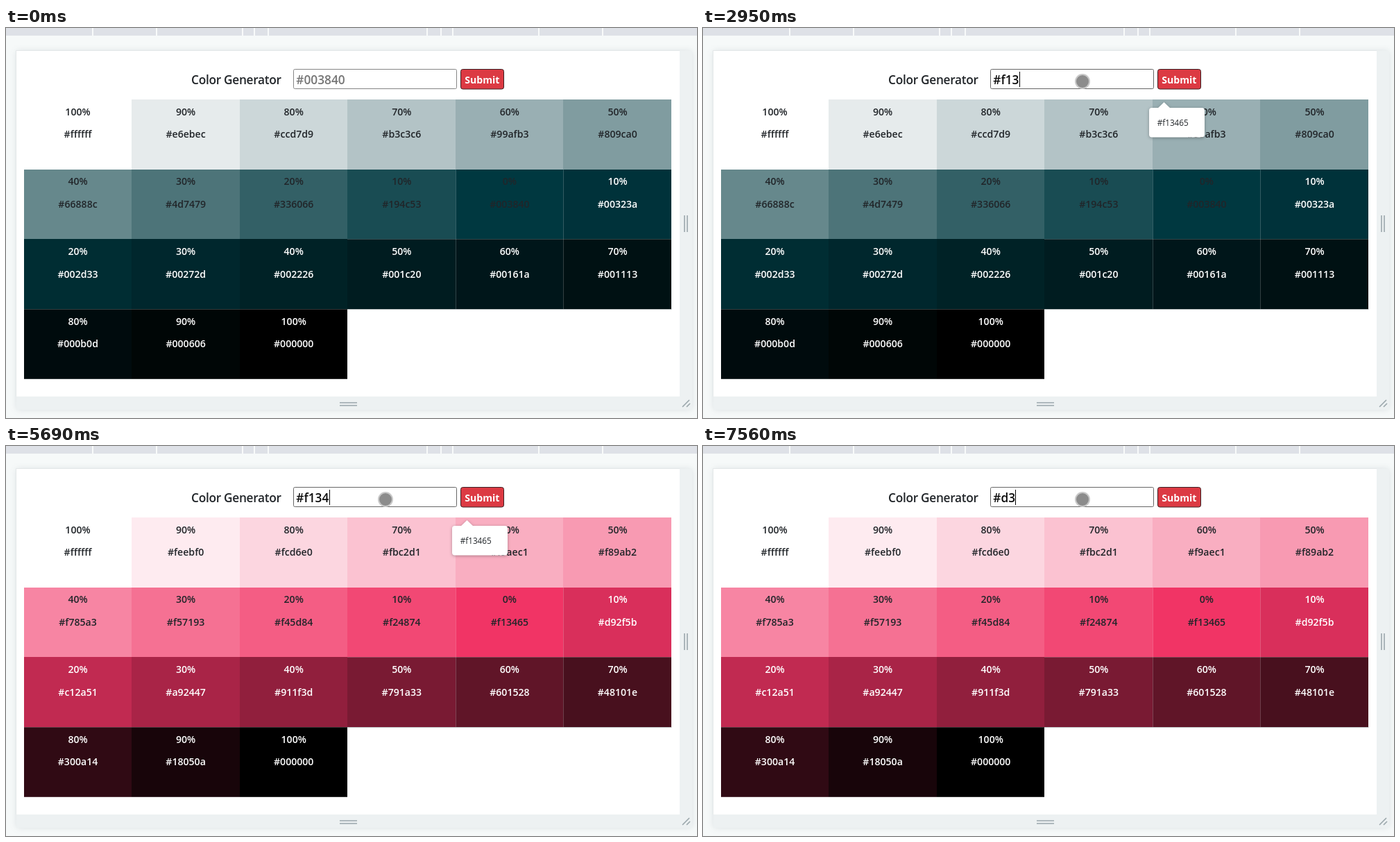
Recreate the animation shown at these times as an HTML page. Size 996 px wide and 562 px high, loop 8000 ms.

```html
<!DOCTYPE html>
<html lang="en">
<head>
<meta charset="utf-8">
<title>Color Generator</title>
<style>
  html, body { margin: 0; width: 100%; height: 100%; overflow: hidden; background: #f6f9f9; }
  svg { display: block; width: 996px; height: 562px; font: 600 14.1px "Open Sans", "Noto Sans", sans-serif; }
  .mid { text-anchor: middle; }
  .field { font-size: 17.3px; }
  .panel { filter: drop-shadow(0 0 5px rgba(60, 80, 90, .14)); }
  #popup { filter: drop-shadow(0 1px 2px rgba(0, 0, 0, .3)); }
  #items { font-size: 11.7px; font-weight: 400; fill: #212529; }
</style>
</head>
<body>
<svg viewBox="0 0 996 562">
  <rect width="996" height="11" fill="#dee1e7"/>
  <path d="M125 0v11M217 0v11M341 0v11M358 0v11M378 0v11M607 0v11M627 0v11M644 0v11M768 0v11M860 0v11" stroke="#f8fafa" stroke-width="2"/>
  <g class="panel">
    <rect x="15" y="33" width="974" height="517" fill="#edf1f2"/>
    <rect x="15" y="33" width="956" height="498" fill="#fff"/>
  </g>
  <path d="M14.5 531V32.5H971" fill="none" stroke="#e3e7e8"/>
  <path d="M978 270v24M982 270v24M481 540h25M481 544h25M975 546l10-10M981 546l5-5" stroke="#9ba7ac" stroke-width="1.6"/>

  <text x="267" y="80.5" font-size="17.3" letter-spacing="-.3" fill="#212529">Color Generator</text>
  <rect id="box" x="414.5" y="59.5" width="235" height="28" rx="2" fill="#fff"/>
  <text id="value" class="field" x="418.3" y="80.5"></text>
  <rect id="caret" y="63" width="1" height="22"/>
  <rect x="655.5" y="59.5" width="62" height="28.5" rx="3" fill="#dc3a43" stroke="#3c2023"/>
  <text class="mid" x="686.3" y="79.6" font-weight="700" fill="#fff">Submit</text>

  <g id="cells"></g>
  <path d="M648.5 204V405M803.5 204V405M959.5 204V405M492 304.5H959M26 405.5H492M26 505.5H492" stroke="#fff" stroke-opacity=".2" fill="none"/>
  <path d="M492 405.5H959.5" stroke="#8a9597" stroke-opacity=".55"/>

  <g id="popup">
    <path d="M655 116l9.5-9 9.5 9z" fill="#fff"/>
    <rect id="sheet" x="643" y="115" width="80" rx="4" fill="#fff"/>
    <g id="items"></g>
  </g>
  <circle id="mouse" r="10" fill="#868686" fill-opacity=".95" stroke="#c9c9c9" stroke-width="2"/>
</svg>

<script>
const LOOP = 8000;
const HISTORY = ['#f34256', '#f13465', '#00161a', '#001c20', '#f34573', '#ffffff'];
const TYPED = [
  [0, ''], [1830, '#'], [2290, '#f'], [2620, '#f1'], [2950, '#f13'], [3150, '#f134'],
  [3430, '#f1346'], [3570, '#f13465'], [5290, '#f1346'], [5690, '#f134'], [5820, '#f13'],
  [5960, '#f1'], [6030, '#f'], [6430, '#'], [6960, '#d'], [7490, '#d3']
];
const CARET_FLIPS = [1100, 1560, 1830, 4100, 4560, 5020, 5220];

const $ = id => document.getElementById(id);
const ramp = (t, a, b) => Math.min(1, Math.max(0, (t - a) / (b - a)));
const mix = (a, b, k) => a + (b - a) * k;

function add(parent, name, attrs) {
  const el = document.createElementNS('http://www.w3.org/2000/svg', name);
  for (const key in attrs) el.setAttribute(key, attrs[key]);
  return parent.appendChild(el);
}

// 100% tint down to the base colour, then up to 100% shade
function palette(base) {
  const rgb = [1, 3, 5].map(i => parseInt(base.substr(i, 2), 16));
  return Array.from({ length: 21 }, (_, i) => {
    const percent = Math.abs(100 - i * 10), keep = (100 - percent) / 100;
    const end = i < 10 ? 255 : 0;
    return '#' + rgb.map(c => Math.round(c * keep + end * (1 - keep))
      .toString(16).padStart(2, '0')).join('');
  });
}

const colX = i => Math.floor(26 + 155.5 * i);
const rowY = j => Math.round(103 + 100.7 * j);
const cells = Array.from({ length: 21 }, (_, i) => {
  const c = i % 6, r = Math.floor(i / 6), x = 103.5 + 155.6 * c, y = 125.6 + 100.7 * r;
  const label = { class: 'mid', x, fill: i > 10 ? '#fff' : '#212529' };
  const rect = add($('cells'), 'rect', {
    x: colX(c), y: rowY(r), width: colX(c + 1) - colX(c), height: rowY(r + 1) - rowY(r)
  });
  add($('cells'), 'text', { ...label, y }).textContent = Math.abs(100 - i * 10) + '%';
  return { rect, text: add($('cells'), 'text', { ...label, y: y + 32.7 }) };
});

const rows = HISTORY.map((_, i) => add($('items'), 'text', { x: 654.7, y: 140.8 + 34.5 * i }));
const palettes = ['#003840', '#f13465'].map(palette);
let shown;

function setPalette(colors) {
  if (shown === colors) return;
  shown = colors;
  cells.forEach((cell, i) => {
    cell.rect.setAttribute('fill', colors[i]);
    cell.text.textContent = colors[i];
  });
}

function drawField(t, value) {
  $('box').setAttribute('stroke', t < 1100 ? '#858585' : '#666');
  $('value').textContent = value || '#003840';
  $('value').setAttribute('fill', value ? '#0c0c0c' : '#757575');
  const width = value ? $('value').getComputedTextLength() : 0;
  $('caret').setAttribute('x', Math.round(418.6 + width));
  $('caret').setAttribute('opacity', CARET_FLIPS.filter(f => f <= t).length % 2);
}

function drawPopup(t, value) {
  const prefix = value[1] === 'd' ? '#' : value;
  const list = HISTORY.filter(h => h.startsWith(prefix));
  const height = 8 + 34.5 * list.length;
  rows.forEach((row, i) => row.textContent = list[i] || '');
  $('sheet').setAttribute('height', height);
  const alpha = ramp(t, 1100, 1230) - ramp(t, 3570, 3770) + ramp(t, 5290, 5490) - ramp(t, 6960, 7220);
  const cy = 115 + height / 2;
  $('popup').setAttribute('opacity', alpha);
  $('popup').setAttribute('transform',
    `translate(683 ${cy}) scale(${mix(.96, 1, alpha)}) translate(-683 ${-cy})`);
}

function drawMouse(t) {
  const k = ramp(t, 200, 970), ease = k * k * (3 - 2 * k);
  $('mouse').setAttribute('cx', mix(938, 547, ease));
  $('mouse').setAttribute('cy', mix(556, 77, ease));
  $('mouse').setAttribute('opacity', t < 200 ? 0 : 1);
}

const start = performance.now();
function frame() {
  const t = (performance.now() - start) % LOOP;
  const value = TYPED.filter(step => step[0] <= t).pop()[1];
  setPalette(palettes[t < 4230 ? 0 : 1]);
  drawField(t, value);
  drawPopup(t, value);
  drawMouse(t);
  requestAnimationFrame(frame);
}
frame();
</script>
</body>
</html>
```
